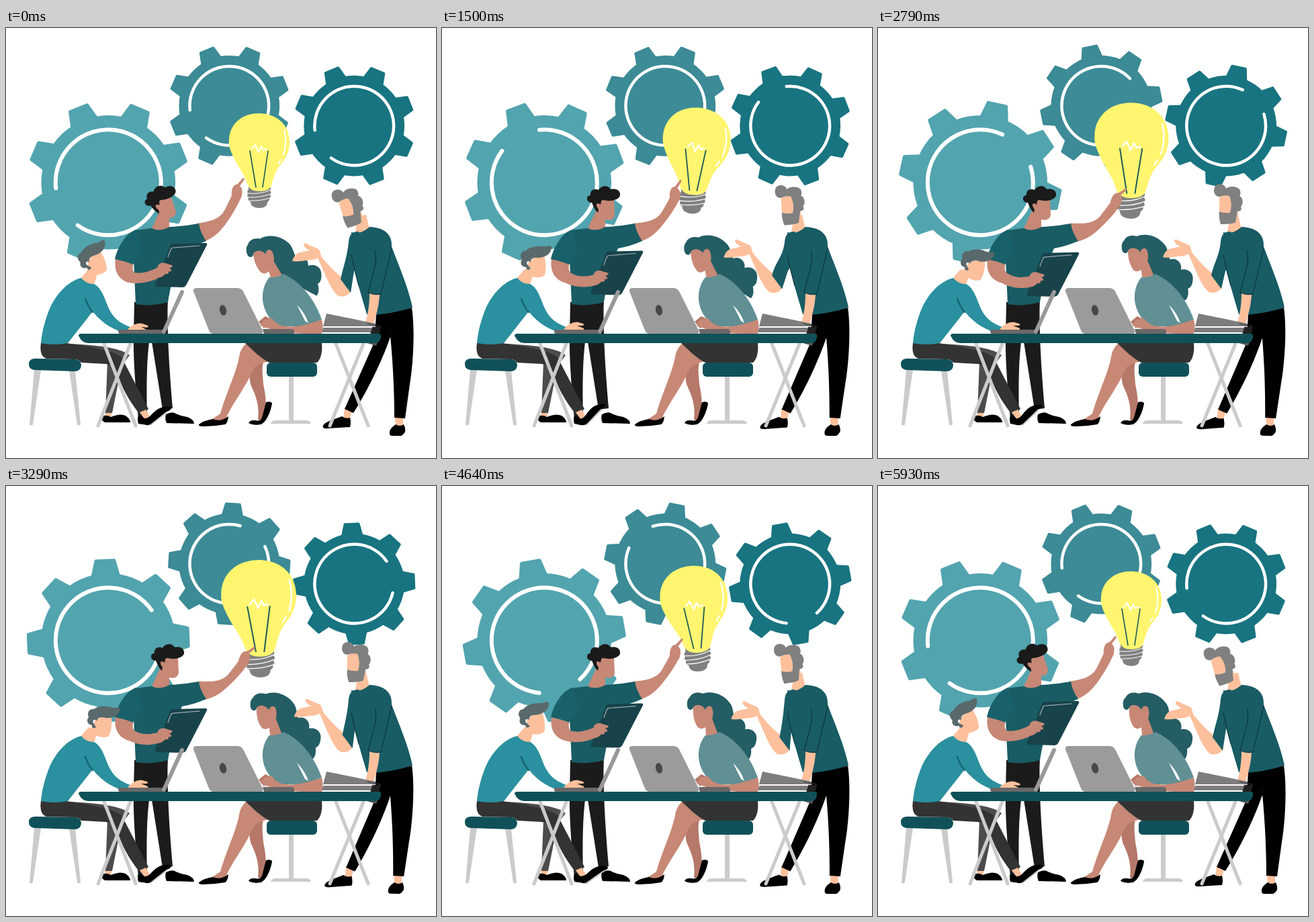
These frames come from a looping animation (640 by 640 pixels, 6000 ms). An HTML page:

```html
<!DOCTYPE html>
<html lang="en">
<head>
<meta charset="utf-8">
<title>Team idea meeting</title>
<style>
html, body { margin: 0; width: 100%; height: 100%; overflow: hidden; background: #fff; }
svg { display: block; width: 100%; height: 100%; }
.line { fill: none; stroke-linecap: round; stroke-linejoin: round; }
.dark { fill: #105159; } .shirt { fill: #195c64; } .tan { fill: #c78876; } .tan2 { fill: #b57869; }
.peach { fill: #fdc09c; } .metal { fill: #cbcbcb; } .grey { fill: #808080; } .coal { fill: #333; }
</style>
</head>
<body>
<svg viewBox="0 0 640 640">
  <g id="gears"></g>

  <g id="bulb">
    <path class="grey" d="M361 236H393Q395 239 393 242Q396 245 393 248Q395 252 392 254Q393 257 389 259Q389 268 376 268Q364 267 364 259Q359 257 361 253Q358 250 360 247Q358 243 361 240Z"/>
    <path class="line" stroke="#fff" stroke-width="1" d="M360 246Q378 248 394 241M360 252Q378 253 394 247M361 257Q378 258 393 253"/>
    <path fill="#fff56f" d="M376 127C402 127 422 143 422 170C422 186 414 197 408 204C400 214 398 224 395 234C393 241 385 243 377 243C368 243 362 240 359 232C354 216 345 206 340 195C334 183 331 175 332 166C333 143 351 127 376 127Z"/>
    <path class="line" stroke="#1b5b58" stroke-width="1.6" d="M363 183L372 237M390 183L382 237"/>
    <path class="line" stroke="#fff" stroke-width="2" d="M366 180L371 174L376 185L380 176L383 182L388 180M414 152Q419 169 413 189M409 196L405 202"/>
  </g>

  <!-- standing presenter -->
  <path fill="#1b1b1b" d="M191 408L241 405C239 440 243 510 248 566L233 568L217 467H213C209 500 209 540 210 582L197 582C193 540 189 490 190 455Z"/>
  <path d="M197 577Q205 581 211 578L215 589Q206 591 197 589Q195 583 197 577ZM238 575Q246 571 251 573Q260 578 270 579Q280 583 280 589L239 588Q236 582 238 575Z"/>
  <path class="tan" d="M231 268L217 298Q229 305 243 297L243 282Z"/>
  <g id="presenterHead">
    <path class="tan" d="M229 263L236 254L256 255L257 278C256 285 250 287 243 285L243 292L225 288L233 274Z"/>
    <path fill="#1a1a1a" d="M232 275C226 269 225 264 223 260C214 260 214 249 221 249C220 242 226 238 233 241C237 234 247 233 251 240C258 238 266 241 265 249C264 256 250 259 240 256C236 256 237 260 236 263C232 259 228 261 231 267L233 270Z"/>
  </g>
  <g id="pointArm">
    <path class="tan" d="M284 291C305 288 318 284 325 272C330 262 333 256 336 249L350 252C344 266 336 279 326 293C317 305 308 313 294 318Z"/>
    <path id="pointHand" class="tan" d="M336 251C335 243 337 237 340 234L345 232L352 224C354 222 356 224 354 227L348 235C353 239 352 246 350 253Z"/>
  </g>
  <path class="shirt" d="M192 301L217 298Q229 304 243 296Q265 295 287 291Q289 304 298 317Q280 325 262 328C252 350 246 380 241 408Q215 415 193 411L190 345Z"/>
  <path id="holdArm" class="tan"/>
  <path fill="#19616a" d="M194 300C177 306 166 327 162 344Q177 347 189 352L203 331Z"/>
  <g id="tablet">
    <path fill="#18434a" d="M244 324Q245 321 248 321L297 320Q300 320 299 323L268 383Q266 386 263 386L224 385Q221 384 222 381Z"/>
    <path class="line" stroke="#a0adaf" stroke-width="1.2" d="M241 341L245 330Q246 327 249 327L288 324"/>
    <path class="tan" d="M226 354C229 348 236 349 240 351L247 353C249 355 246 357 243 357L246 360C247 362 245 363 242 362C243 366 240 367 237 366C233 371 228 372 223 372Z"/>
  </g>

  <!-- seated man -->
  <path class="metal" d="M42 509H52L40 590Q37 593 35 590ZM94 510H103L111 590Q109 593 106 590Z"/>
  <path class="dark" d="M44 492L103 493Q112 494 112 502Q111 511 102 511L42 509Q34 508 34 500Q34 492 44 492Z"/>
  <path class="peach" d="M148 571H158L156 580H147Z"/>
  <path fill="#4c4c4c" d="M95 470Q168 473 184 487L172 503L158 573H148L151 496Z"/>
  <path class="coal" d="M52 469H90C125 474 160 480 172 490L212 567L200 576C183 555 170 532 163 506Q160 501 148 500L112 498Q108 493 102 493L60 492Q49 488 52 469Z"/>
  <path d="M142 578Q150 575 156 579Q170 573 178 577Q185 582 185 587L147 587Q141 584 142 578Z"/>
  <path class="peach" d="M199 572L208 568L214 578L207 583Z"/>
  <g id="foot">
    <path class="line" stroke="#aaa" stroke-width="1" d="M214 592L240 572"/>
    <path d="M202 580Q209 583 215 577Q224 567 231 565Q240 562 246 565Q246 569 239 571L215 590Q209 593 200 588Z"/>
  </g>
  <path class="peach" d="M123 359L110 374Q119 384 131 382L136 366Z"/>
  <g id="seatedHead">
    <path class="peach" d="M133 348L148 342L157 345C158 356 156 367 153 372C147 376 138 373 134 371L121 366L130 355Z"/>
    <path fill="#5a696b" d="M134 359C130 362 127 359 128 356C121 355 119 349 123 344C120 337 124 331 131 332C138 326 152 327 158 330C164 330 168 329 170 332C167 343 158 346 148 345C140 343 136 345 135 350C132 345 127 349 131 354Z"/>
  </g>
  <path fill="#2b909f" d="M112 372Q119 381 131 381C145 388 148 410 156 423C163 435 174 441 185 445L180 454C163 451 144 441 129 422L92 469Q72 473 52 469C53 455 57 438 64 420C73 398 91 377 112 372Z"/>
  <path class="line" stroke="#14606a" stroke-width="2.2" d="M118 403Q122 415 129 423"/>
  <path id="typingHand" class="peach" d="M183 446C190 440 196 437 203 438L210 440Q213 442 209 443L201 443L211 447Q212 450 208 450H181Z"/>
  <path class="line" stroke="#6a6868" stroke-width="6" d="M170 452H234"/>
  <path class="line" stroke="#9b989a" stroke-width="6" d="M262 393L235 452"/>

  <!-- seated woman -->
  <path class="metal" d="M421 515H428V584H446Q453 584 454 589H394Q395 584 402 584H421Z"/>
  <path class="tan2" d="M369 494C361 510 361 525 366 535C374 552 377 565 375 583L384 585C389 560 386 545 383 530C382 515 380 505 384 494Z"/>
  <path class="tan" d="M362 466C351 474 348 482 347 490C342 515 327 545 319 574L304 584L327 584L329 577C342 552 358 532 367 510Q372 499 392 496Z"/>
  <path d="M287 590C295 584 303 583 308 582Q319 587 331 578Q330 588 326 590Q310 593 293 593Q286 593 287 590ZM361 588C363 583 368 584 372 584Q378 586 381 580L387 557Q395 555 396 559C393 575 386 588 379 590Q368 592 361 588Z"/>
  <path class="coal" d="M355 468H470Q472 489 463 498H392C378 491 368 480 355 468Z"/>
  <rect class="dark" x="388" y="498" width="75" height="21" rx="6"/>
  <g id="womanHead">
    <path fill="#245d64" d="M366 331C364 326 364 318 369 314C372 308 380 306 388 309C402 304 420 310 430 325C434 332 433 340 436 346C446 343 454 353 451 362C462 360 470 368 468 378C467 387 463 390 460 391C461 399 459 405 455 408L410 372L374 330Q371 336 366 331Z"/>
    <path class="tan" d="M374 329C378 324 388 325 392 333C394 326 402 325 403 334C404 340 403 344 402 346L411 370Q402 375 393 371L392 359C388 362 383 362 380 358C375 350 373 340 374 329Z"/>
  </g>
  <path fill="#608f94" d="M392 371Q404 372 413 366C440 378 460 405 470 434L448 444H404C392 433 383 420 382 404C381 390 386 378 392 371Z"/>
  <path fill="#fff" d="M433 412Q445 424 450 439L445 436Z"/>
  <path class="tan2" d="M376 437L386 429L398 435L384 447Z"/>
  <path class="tan" d="M379 443L384 434L396 432C400 438 405 442 415 444C435 446 452 440 470 434Q473 445 470 455H440C415 453 395 450 379 443Z"/>
  <path fill="#6a6868" d="M382 448H426Q430 449 429 455H384Z"/>
  <path fill="#9b9b9b" d="M279 392Q278 387 284 387H344Q350 387 353 392L382 450Q384 455 379 455H309Q304 455 302 450Z"/>
  <ellipse cx="323" cy="420" rx="5" ry="8" transform="rotate(-12 323 420)" fill="#484848"/>

  <!-- standing man on the right -->
  <g id="leftLeg">
    <path class="peach" d="M504 565L515 570L512 582H502Z"/>
    <path d="M551 426L571 424L572 460C560 495 538 540 517 573L504 567L548 468Z"/>
    <path d="M472 592C474 586 490 582 500 578Q505 582 512 580Q514 588 512 594L478 596Q470 596 472 592Z"/>
  </g>
  <g id="rightLeg">
    <path class="peach" d="M579 578H591V593H580Z"/>
    <path d="M562 426L604 416C609 450 606 500 601 530L594 581L578 580C578 545 576 490 570 440Z"/>
    <path d="M571 604C570 597 576 593 580 590Q586 594 592 590Q595 596 594 601Q591 606 588 607H575Q571 607 571 604Z"/>
  </g>
  <path class="peach" d="M524 280L520 304Q530 309 541 300L536 278Z"/>
  <g id="rightHead">
    <path class="peach" d="M508 252L524 246L534 262L537 288L523 292V279H508Z"/>
    <path class="grey" d="M509 251C502 252 498 244 501 237C504 230 516 231 518 239C524 234 534 236 538 240C540 244 540 248 538 250C544 253 544 262 540 266C542 270 540 273 535 273L532 289Q530 292 510 292C508 285 507 278 508 273Q514 276 524 275Q528 262 523 250Q517 248 509 251Z"/>
  </g>
  <path id="talkArm" class="peach" d="M426 347C428 340 432 335 438 334L452 331C447 328 443 326 443 322C445 319 448 321 451 323L465 329C468 332 468 338 470 341C480 353 490 364 501 372L514 390C511 398 504 401 495 399C484 392 475 366 464 342C458 346 452 345 446 346C440 347 432 348 426 347Z"/>
  <path id="talkSleeve" class="shirt"/>
  <path class="shirt" d="M514 304Q528 308 541 296C562 297 575 306 574 325C580 343 599 385 605 416Q580 424 550 427L537 426C531 405 520 370 513 338Z"/>
  <path class="line" stroke="#0b2e33" stroke-width="1" d="M514 338Q519 362 525 384M549 331C554 346 546 365 539 394Q548 398 558 396L574 328"/>
  <path class="peach" d="M541 395Q548 398 556 397C555 415 550 430 547 441L535 438C539 425 541 410 541 395Z"/>

  <!-- books, table -->
  <path fill="#7d7d7d" d="M477 425L550 440V444H472ZM472 446H546V453H470Z"/>
  <path class="line" stroke="#333" stroke-width="1.2" d="M538 440L557 444L555 454H543L546 445"/>
  <path fill="#222" d="M546 445H556L554 455H543Z"/>
  <path fill="#555" d="M534 468H553L551 473Z"/>
  <path class="line" stroke="#cbcbcb" stroke-width="5" d="M146 470L193 592M185 470L137 592M491 470L539 592M532 470L482 592"/>
  <path class="dark" d="M108 458Q108 455 112 455H555Q559 455 558 460Q557 469 549 469H122Q113 469 108 458Z"/>
</svg>

<script>
const FPS = 14, LAST = 83, LOOP = 6000;
const $ = id => document.getElementById(id);

const move = (id, value) => $(id).setAttribute('transform', value);
const turn = (id, angle, x, y) => move(id, `rotate(${angle} ${x} ${y})`);

// Rises 0 to 1 from start to peak, then falls back to 0 at end.
const swell = (f, start, peak, end) =>
  Math.max(0, Math.min((f - start) / (peak - start), (end - f) / (end - peak)));

// Rises to 1, stays there, and falls back at the end of the loop.
const hold = (f, rise, fall) => Math.min(1, f / rise, (LAST - f) / fall);

const gears = [
  { x: 152.3, y: 229.8, size: 1, color: '#52a4af', dir: 1 },
  { x: 332.3, y: 115.8, size: 0.75, color: '#3c8b96', dir: -1 },
  { x: 518.2, y: 145.6, size: 0.75, color: '#187481', dir: 1 }
];

function polar(r, deg) {
  const a = deg * Math.PI / 180;
  return `${r * Math.cos(a)} ${r * Math.sin(a)}`;
}

$('gears').innerHTML = gears.map(({ color }, i) => {
  let teeth = '';
  for (let k = 0; k < 8; k++) {
    teeth += `<path d="M-20 -92L-13.5 -118.5H13.5L20 -92Z" transform="rotate(${22.5 + 45 * k})"/>`;
  }
  return `<g id="gear${i}" fill="${color}" stroke="${color}" stroke-width="5" stroke-linejoin="round">
    <circle r="97.3"/>${teeth}
    <path class="line" stroke="#fff" stroke-width="6" d="M${polar(78.5, 173)}A78.5 78.5 0 1 1 ${polar(78.5, 125)}"/></g>`;
}).join('');

function draw(f) {
  const turned = 360 * f / LAST;
  gears.forEach((g, i) =>
    move('gear' + i, `translate(${g.x} ${g.y}) rotate(${g.dir * turned + 0.6}) scale(${g.size})`));

  const tilt = 4 * Math.sin(turned * Math.PI / 180);
  const scale = 1 + 0.253 * swell(f, 0, 44, LAST);
  move('bulb', `translate(377 197.5) rotate(${tilt}) scale(${scale}) translate(-377 -197.5)`);

  turn('presenterHead', 16 * hold(f, 21, 17) - 16, 235, 290);
  turn('pointArm', 13.5 * swell(f, 13, 43, 73), 288, 303);
  const bend = 3 * swell(f, 31, 42, 57) - 15 * swell(f, 0, 11, 31) - 5.5 * swell(f, 57, 73, LAST);
  turn('pointHand', bend, 343, 249);

  const y = 17 * swell(f, 0, 31, 74);
  move('tablet', `translate(0 ${y})`);
  $('holdArm').setAttribute('d', `M163 343C160 362 168 375 183 379C198 ${382 + y * 0.4} 215 ${378 + y * 0.8} 230 ${371 + y}
    L228 ${355 + y}C214 ${363 + y * 0.7} 201 ${366 + y * 0.4} 191 364C188 360 188 354 190 350Z`);

  turn('seatedHead', 33 * swell(f, 0, 38, LAST) - 27, 126, 372);
  turn('typingHand', 6 - 6 * hold(f, 8, 8), 183, 448);
  turn('foot', 5 * swell(f, 46, 58, LAST) - 12 * swell(f, 0, 31, 46), 210, 586);
  turn('womanHead', -10.7 * Math.max(0, 1 - f / 54), 408, 365);

  const lean = hold(f, 29, 29);
  turn('rightHead', 16 * lean - 16, 530, 300);
  turn('leftLeg', -0.9 * lean, 560, 430);
  turn('rightLeg', 0.7 * lean, 585, 430);

  const dx = 7 * swell(f, 41, 54, LAST) - 10 * swell(f, 0, 31, 41);
  const dy = -8 * swell(f, 0, 31, 58);
  move('talkArm', `translate(${dx} ${dy})`);
  $('talkSleeve').setAttribute('d', `M525 303C514 303 511 309 510 318
    C508 340 ${502 + dx} ${355 + dy} ${498 + dx} ${374 + dy}L${513 + dx} ${394 + dy}L${518 + dx / 2} 362L535 330Z`);
}

const start = performance.now();
function tick() {
  const t = (performance.now() - start) % LOOP;
  draw(Math.min(LAST, Math.floor(t * FPS / 1000 + 0.08)));
  requestAnimationFrame(tick);
}
tick();
</script>
</body>
</html>
```
